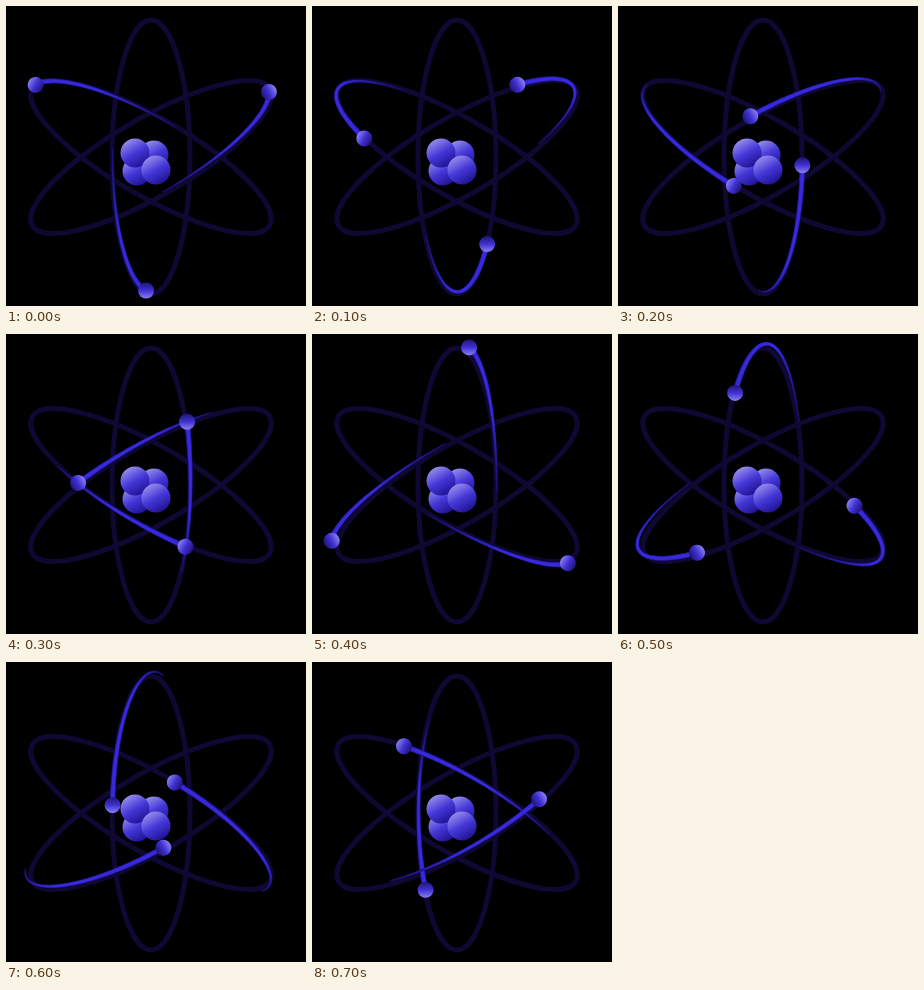
Animation, 300 px wide and 300 px high, one loop 0.8 s. Source, as an HTML page with a canvas:

```html
<!DOCTYPE html>
<html lang="en">
<head>
<meta charset="utf-8">
<title>Atom</title>
<style>
  html, body { margin: 0; width: 100%; height: 100%; overflow: hidden; background: #000; }
  canvas { display: block; width: 300px; height: 300px; }
</style>
</head>
<body>
<canvas id="stage"></canvas>
<script>
const SIZE = 300, STEP = 100, TURN = Math.PI * 2;
const TILTS = [0, TURN / 3, -TURN / 3];
// Orbit angle of the electron at each step, in degrees from the bottom.
const ANGLES = [-8, 49.5, 86, 116.3, 167, 229.5, 267.3, 305];

const canvas = document.getElementById('stage');
const ctx = canvas.getContext('2d');
const ratio = window.devicePixelRatio || 1;
canvas.width = canvas.height = SIZE * ratio;

const mix = (a, b, k) => a + (b - a) * k;
const rgb = (a, b, k) => `rgb(${a.map((v, i) => Math.round(mix(v, b[i], k)))})`;

function angleAt(step) {
  const n = ANGLES.length;
  const lap = Math.floor(step / n);
  return (ANGLES[step - lap * n] + 360 * lap) * Math.PI / 180;
}

// Electron path: an ellipse, slightly taller at its far end.
function pathPoint(angle) {
  const s = Math.sin(angle), c = Math.cos(angle);
  const far = Math.max(0, -c);
  return [1.3 + 39 * s + 3 * far * far, c * (c > 0 ? 136 : 140)];
}

function ball(x, y, r, [dx, dy], stops) {
  const fill = ctx.createLinearGradient(x + dx * r, y + dy * r, x - dx * r, y - dy * r);
  stops.forEach((color, i) => fill.addColorStop(i / (stops.length - 1), color));
  ctx.fillStyle = fill;
  ctx.beginPath();
  ctx.arc(x, y, r, 0, TURN);
  ctx.fill();
}

function eachTilt(x, y, paint) {
  for (const tilt of TILTS) {
    ctx.save();
    ctx.translate(x, y);
    ctx.rotate(tilt);
    paint();
    ctx.restore();
  }
}

function orbit() {
  ctx.strokeStyle = '#0e0833';
  ctx.lineWidth = 5;
  ctx.beginPath();
  ctx.ellipse(0, 0, 39, 137, 0, 0, TURN);
  ctx.stroke();
}

function ribbon(from, to, dark, bright, thin, thick) {
  const parts = 70;
  ctx.lineCap = 'round';
  for (let i = 0; i < parts; i++) {
    const k = (i + 1) / parts;
    ctx.strokeStyle = rgb(dark, bright, Math.min(1, k * 2.2));
    ctx.lineWidth = mix(thin, thick, k);
    ctx.beginPath();
    ctx.moveTo(...pathPoint(mix(from, to, i / parts)));
    ctx.lineTo(...pathPoint(mix(from, to, k)));
    ctx.stroke();
  }
}

function trail(step) {
  const tail = angleAt(step - 2), head = angleAt(step);
  ribbon(tail, head, [16, 10, 64], [36, 25, 150], 1.6, 5.4);
  ribbon(tail, head, [24, 16, 100], [56, 42, 220], 0.9, 3.6);
}

function electron(step) {
  const [x, y] = pathPoint(angleAt(step));
  ball(x, y, 8, [0, 1], ['#8a80ee', '#3f31d2', '#1f1478']);
}

function nucleus() {
  const shades = ['#948bea', '#4537d8', '#1f1494'];
  const light = [-0.5, -0.86];
  for (const [x, y] of [[131, 165], [148, 149], [129, 147], [150, 164]]) {
    ball(x, y, 14.5, light, shades);
  }
}

function draw(step) {
  ctx.setTransform(ratio, 0, 0, ratio, 0, 0);
  ctx.fillStyle = '#000';
  ctx.fillRect(0, 0, SIZE, SIZE);
  eachTilt(145, 151, orbit);
  eachTilt(144.2, 149.8, () => trail(step));
  eachTilt(144.2, 149.8, () => electron(step));
  nucleus();
}

function tick() {
  draw(Math.floor(performance.now() / STEP) % ANGLES.length);
  requestAnimationFrame(tick);
}
tick();
</script>
</body>
</html>
```
